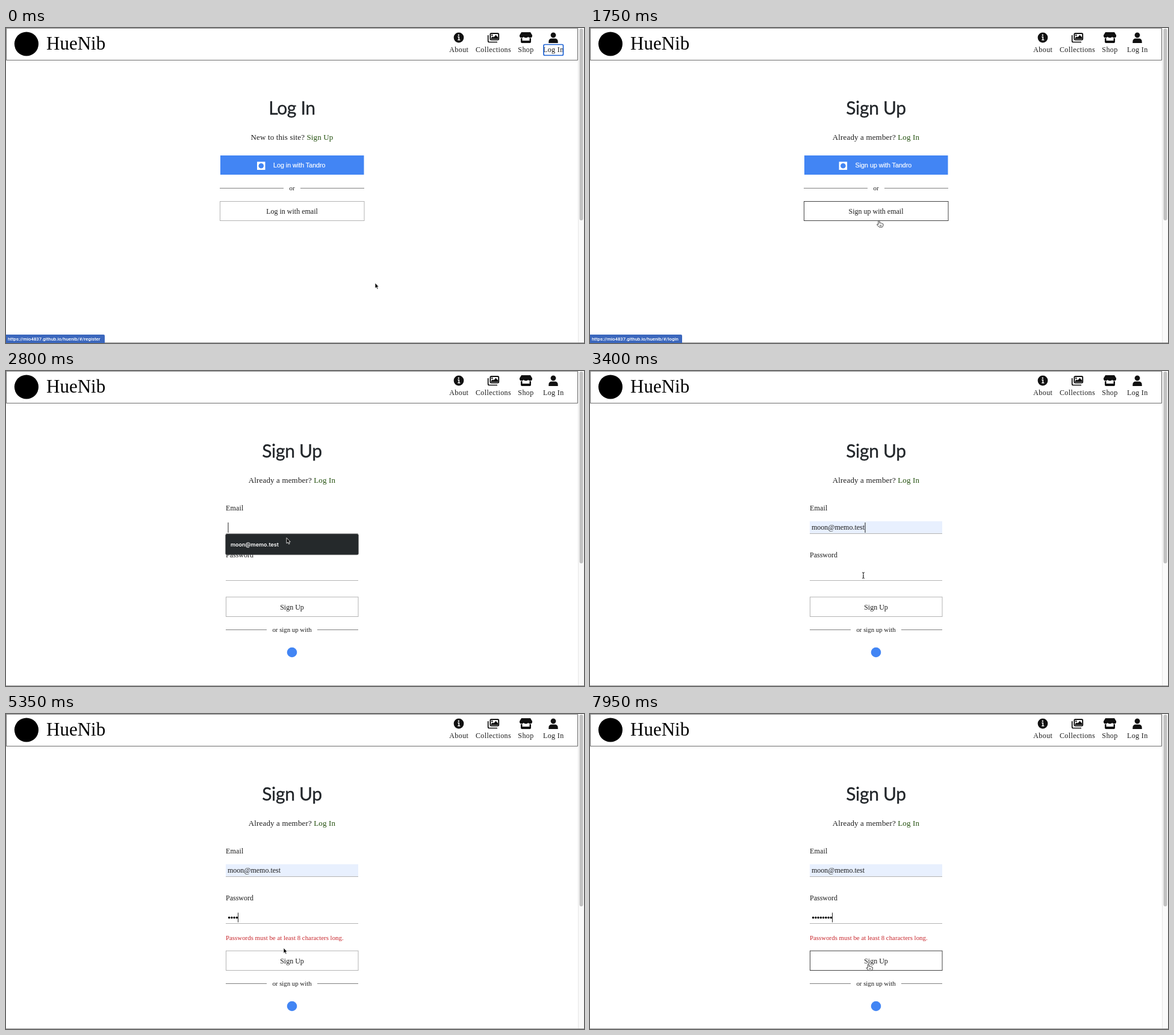
Recreate the animation shown at these times as an HTML page. Size 960 px wide and 524 px high, loop 8000 ms.

```html
<!DOCTYPE html>
<html lang="en">
<head>
<meta charset="utf-8">
<title>Sign up</title>
<style>
  html, body { margin: 0; width: 100%; height: 100%; overflow: hidden; background: #fff; }
  svg { display: block; width: 100%; height: 100%; }
  text { font: 12px "Liberation Serif", Times, serif; fill: #1c1c1c; }
  .mid { text-anchor: middle; }
  .brand { font-size: 31px; fill: #000; }
  .nav text { letter-spacing: .4px; }
  .title { font: 30px Lato, "Open Sans", sans-serif; letter-spacing: -.3px; fill: #212529; stroke: #212529; stroke-width: .3px; }
  .ask { font-size: 13px; letter-spacing: .15px; }
  .ask tspan { fill: #24500f; }
  .sans { font: 10.7px "Liberation Sans", Arial, sans-serif; fill: #fff; stroke: #fff; stroke-width: .2px; }
  .small { font-size: 10.8px; }
  .err { fill: #c7252b; letter-spacing: .03px; }
  .tip { font: 600 9px Inter, sans-serif; fill: #fff; }
  .url { font: 500 7.8px Roboto, sans-serif; fill: #fff; }
  .box { fill: #fff; stroke: #b4b4b4; }
  .rule { stroke: #808080; }
  .line { stroke: #b4b4b4; }
  .caret { stroke: #222; }
</style>
</head>
<body>
<svg viewBox="0 0 960 524" preserveAspectRatio="none">
  <!-- browser and header -->
  <path d="M.5 0V53.5H949.5V0" fill="none" stroke="#6c6c6c"/>
  <path d="M0 .5H950" stroke="#888"/>
  <path d="M0 523.5H960" stroke="#999"/>
  <path d="M950 1h10v522h-10z" fill="#fafafa"/>
  <path d="M950.5 1V523" stroke="#e6e6e6"/>
  <rect x="952.5" y="1" width="6" height="319" rx="3" fill="#c1c1c1"/>
  <circle cx="34" cy="26.5" r="20" fill="#000"/>
  <text class="brand" x="67" y="36">HueNib</text>

  <g class="nav mid">
    <g fill="#111">
      <circle cx="752" cy="16" r="8.4"/>
      <rect x="804.5" y="9" width="13.7" height="10.5" rx="1.5" fill="#fff" stroke="#111" stroke-width="2"/>
      <path d="M806 18v-1.5l2.500-2.500 1.500 1.500 3.500-4 3.500 4v2.500z"/>
      <circle cx="807.5" cy="12" r="1.2"/>
      <path d="M800.700 12v9.500q0 2 2 2H816" fill="none" stroke="#111" stroke-width="1.700"/>
      <path d="M856 7h15l3 5q.5 4-3 4.300-2.500 0-3.700-1.500-1.500 1.500-3.800 1.500t-3.800-1.500q-1.200 1.500-3.700 1.500-3.500-.3-3-4.300z"/>
      <path d="M855 17h2.500v4h12v-4h2.500v6q0 2-2 2h-13q-2 0-2-2z"/>
      <circle cx="909" cy="11.800" r="4.400"/>
      <path d="M901.300 25v-2q0-5.500 5-5.500h5.400q5 0 5 5.500v2z"/>
    </g>
    <path d="M750.300 14.800h2v5m-2 0h4" fill="none" stroke="#fff" stroke-width="1.500"/>
    <circle cx="751.800" cy="11.800" r="1.200" fill="#fff"/>
    <text x="752.300" y="40">About</text>
    <text x="809.500" y="40">Collections</text>
    <text x="863.500" y="40">Shop</text>
    <text x="909.300" y="40">Log In</text>
    <rect id="focus" x="893" y="27.500" width="32.500" height="18" rx="2" fill="none" stroke="#2064d4" stroke-width="1.700"/>
  </g>

  <text class="title mid" id="title" x="475" y="144"></text>
  <text class="ask mid" x="475" y="186"><tspan id="ask" style="fill:inherit"></tspan> <tspan id="link"></tspan></text>

  <!-- choice of login method -->
  <g id="choice">
    <path d="M356 212h238.500v32H356z" fill="#4285f4"/>
    <g id="provider">
      <path d="M417 222.500h13.500v13.500H417z" fill="#fff"/>
      <circle cx="423.800" cy="229.200" r="4.300" fill="#4285f4"/>
      <text class="sans" id="withProvider" x="444" y="232"></text>
    </g>
    <path class="rule" d="M355 266.500H461M489 266.500H595"/>
    <text class="small mid" x="475" y="270">or</text>
    <rect class="box" id="mailBox" x="355.500" y="288.500" width="239.500" height="32"/>
    <text class="mid" id="withMail" x="475" y="308.500"></text>
  </g>

  <!-- email form -->
  <g id="form">
    <text x="365" y="231.500" letter-spacing=".2">Email</text>
    <path id="filled" d="M365 250h220v20H365z" fill="#e8f0fe"/>
    <path class="line" d="M365 270.500H585M365 348.500H585"/>
    <text id="mail" x="368" y="264">moon@memo.test</text>
    <path class="caret" id="mailCaret" d="M369 252v17"/>
    <text x="365" y="310">Password</text>
    <g id="dots"></g>
    <path class="caret" id="passCaret" d="M368.500 330.500v16"/>
    <text class="small err" id="error" x="365" y="375.500">Passwords must be at least 8 characters long.</text>
    <g id="lower">
      <rect class="box" id="sendBox" x="365.500" y="376" width="219.500" height="32.500"/>
      <text class="mid" x="475" y="396.500">Sign Up</text>
      <path class="rule" d="M365 430.500H433M517 430.500H585"/>
      <text class="small mid" x="475" y="434">or sign up with</text>
      <circle cx="475" cy="468" r="8.300" fill="#4285f4"/>
    </g>
    <g id="popup">
      <rect x="364.500" y="271" width="221" height="34.800" rx="2.500" fill="#25292b" stroke="#777" stroke-width=".5"/>
      <text class="tip" x="373" y="291.500">moon@memo.test</text>
    </g>
  </g>

  <g id="status">
    <path id="statusBox" fill="#3b67bd"/>
    <text class="url" id="url" x="3" y="520"></text>
  </g>

  <g id="cursor" stroke-linejoin="round">
    <path id="arrow" d="M0 0V9.200L2.100 7.300 3.600 10.500 5.100 9.800 3.700 6.700H6.300z" fill="#000" stroke="#fff" stroke-width=".8"/>
    <path id="hand" d="M-1.200 5.500V1Q-1.200 0 0 0T1 1V4Q2.500 3 3.300 4.300 4.800 3.600 5.300 5 7 4.600 7 6.200 7 9 5.500 10.700H.3L-3.500 6.700Q-3.200 5-1.200 6.500zM1.700 7v2M3.500 7v2" fill="#fff" stroke="#222" stroke-width=".9"/>
    <path id="beam" d="M-2 0Q0 0 0 1.500 0 0 2 0M0 1V9M-2 10Q0 10 0 8.500 0 10 2 10M-1 6H1" fill="none" stroke="#222"/>
  </g>
</svg>
<script>
const LOOP = 8000;
const $ = id => document.getElementById(id);
const show = (id, on) => $(id).style.display = on ? "" : "none";
const clamp = v => Math.max(0, Math.min(1, v));
const between = (t, a, b) => t >= a && t < b;

// time, x, y of the pointer tip
const path = [
  [250, 613, 424], [520, 526, 176.5], [1100, 526, 176.5], [1650, 480, 320.5],
  [2050, 480, 320.5], [2400, 470, 257], [2550, 470, 257], [2800, 466, 277.5],
  [3000, 452, 286], [3120, 452, 286], [3400, 454, 335], [4600, 454, 335],
  [4950, 461, 389], [5500, 461, 389], [6050, 454, 339], [7400, 454, 339], [7800, 462.5, 416]
];
// pointer shape from each time on
const shapes = [
  [0, "arrow"], [490, "hand"], [1150, "arrow"], [1500, "hand"], [2100, "arrow"],
  [2300, "beam"], [2650, "arrow"], [3250, "beam"], [3650, "none"], [4600, "beam"],
  [4700, "arrow"], [4850, "hand"], [5200, "arrow"], [5750, "beam"], [6700, "none"],
  [7400, "beam"], [7500, "arrow"], [7700, "hand"]
];
const keys = [3700, 3900, 4100, 4300, 6800, 6950, 7100, 7250];

$("dots").innerHTML = keys.map((_, i) => `<circle cx="${370.6 + 4.25 * i}" cy="338.8" r="1.75"/>`).join("");

function pointer(t) {
  const i = path.findIndex(p => p[0] > t);
  if (i === 0) return path[0].slice(1);
  if (i < 0) return path[path.length - 1].slice(1);
  const [a, ax, ay] = path[i - 1], [b, bx, by] = path[i];
  const k = (t - a) / (b - a), e = k * k * (3 - 2 * k);
  return [ax + (bx - ax) * e, ay + (by - ay) * e];
}

function hover(id, on) {
  $(id).style.stroke = on ? "#444" : "";
}

function status(t) {
  const first = t < 150;
  const alpha = first ? 1 - clamp((t - 30) / 70) : clamp((t - 950) / 80) * (1 - clamp((t - 1950) / 100));
  $("status").setAttribute("opacity", alpha);
  $("statusBox").setAttribute("d", `M0 510H${first ? 162 : 151}q2 0 2 2V524H0z`);
  $("url").textContent = "https://mio4837.github.io/huenib/#/" + (first ? "register" : "login");
}

function draw(t) {
  const login = t < 750, form = t >= 2050, error = t >= 5150;
  const verb = login ? "Log in" : "Sign up";
  const [x, y] = pointer(t);
  const shift = error ? 18 : 0;
  const typed = keys.filter(k => k <= t).length;

  show("focus", login);
  $("title").textContent = login ? "Log In" : "Sign Up";
  $("ask").textContent = login ? "New to this site?" : "Already a member?";
  $("link").textContent = login ? "Sign Up" : "Log In";

  show("choice", !form);
  $("withProvider").textContent = verb + " with Tandro";
  $("withMail").textContent = verb + " with email";
  $("provider").setAttribute("transform", `translate(${login ? 0 : -3.4} 0)`);
  hover("mailBox", between(y, 287, 322) && !login);

  show("form", form);
  show("popup", between(t, 2500, 3100));
  show("mailCaret", between(t, 2450, 3450));
  show("filled", t >= 3100);
  show("mail", t >= 3100);
  $("mailCaret").setAttribute("transform", `translate(${t < 3100 ? 0 : 88} 0)`);
  [...$("dots").children].forEach((d, i) => d.style.display = i < typed ? "" : "none");
  show("passCaret", t >= 3450);
  $("passCaret").setAttribute("transform", `translate(${4.25 * typed} 0)`);
  show("error", error);
  $("lower").setAttribute("transform", `translate(0 ${shift})`);
  hover("sendBox", between(y, 376 + shift, 409 + shift));

  status(t);
  const shape = shapes.filter(s => s[0] <= t).pop()[1];
  for (const id of ["arrow", "hand", "beam"]) show(id, id === shape);
  $("cursor").setAttribute("transform", `translate(${x} ${y})`);
}

const start = performance.now();
function tick() {
  draw((performance.now() - start) % LOOP);
  requestAnimationFrame(tick);
}
tick();
</script>
</body>
</html>
```
